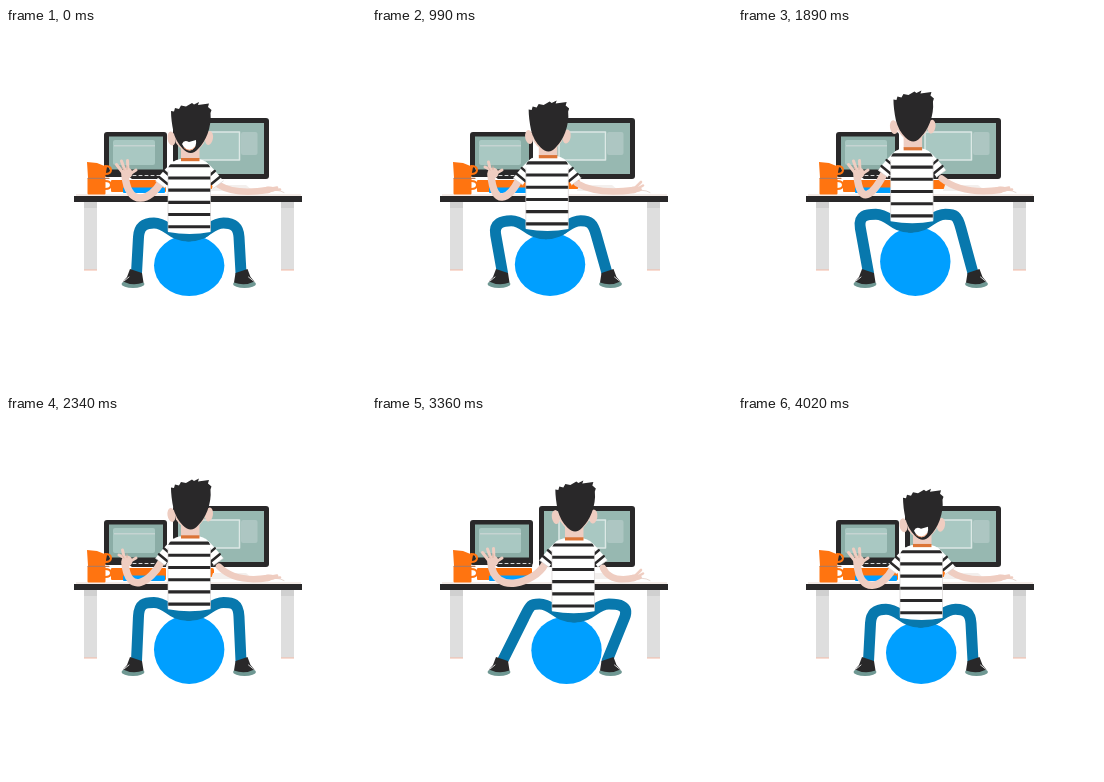
These frames come from a looping animation (360 px wide and 360 px high, 4.05 s). An HTML page with a canvas:

```html
<!DOCTYPE html>
<html lang="en">
<head>
<meta charset="utf-8">
<title>Desk bounce</title>
<style>
html, body { margin: 0; width: 100%; height: 100%; overflow: hidden; background: #fff; }
canvas { display: block; width: 360px; height: 360px; }
</style>
</head>
<body>
<canvas id="stage"></canvas>
<script>
const LOOP = 4050, STEP = 30, BEAT = LOOP / 8;
const INK = '#292829', SKIN = '#efcdc1', ORANGE = '#ff7410', PALE = '#a9c8c2',
  JEANS = '#0878ad', BALL = '#009fff', GREY = '#dedede';
const HEIGHTS = [16, 16, 15, 15, 12, 12, 10, 9];
const SWAY = [[0, 0], [600, 0], [1400, -17], [1480, -17], [2360, 0], [3380, 18], [4010, 0], [LOOP, 0]];

const canvas = document.getElementById('stage');
const c = canvas.getContext('2d');
const ratio = window.devicePixelRatio || 1;
canvas.width = canvas.height = 360 * ratio;
c.lineCap = c.lineJoin = 'round';

function rect(x, y, w, h, color, r = 0) {
  c.fillStyle = color;
  c.beginPath();
  c.roundRect(x, y, w, h, r);
  c.fill();
}

function oval(x, y, rx, ry, color, turn = 0) {
  c.fillStyle = color;
  c.beginPath();
  c.ellipse(x, y, rx, ry, turn, 0, 7);
  c.fill();
}

function fill(d, color) {
  c.fillStyle = color;
  c.fill(new Path2D(d));
}

function line(d, color, width) {
  c.strokeStyle = color;
  c.lineWidth = width;
  c.stroke(new Path2D(d));
}

function at(x, y, draw) {
  c.save();
  c.translate(x, y);
  draw();
  c.restore();
}

// draws once as is and once mirrored about the given axis
function pair(axis, draw) {
  draw(1);
  at(axis * 2, 0, () => {
    c.scale(-1, 1);
    draw(-1);
  });
}

function sway(t) {
  const i = SWAY.findIndex(k => k[0] > t);
  const [t0, a] = SWAY[i - 1], [t1, b] = SWAY[i];
  const u = (t - t0) / (t1 - t0);
  return a + (b - a) * u * u * (3 - 2 * u);
}

// skew moves the top of the hop: below 1 earlier, above 1 later
function hop(t, skew, power) {
  const n = Math.min(7, Math.floor(t / BEAT));
  const p = t / BEAT - n;
  return -HEIGHTS[n] * Math.pow(Math.max(0, Math.sin(Math.PI * Math.pow(p, skew))), power);
}

function drawScreens() {
  rect(98, 104, 63, 45, INK, 3);
  rect(103, 108.5, 54, 33, '#8bada6');
  rect(107, 112, 42, 25, PALE, 2);
  rect(108, 117, 41, 1.5, '#c5d4d2');

  rect(167, 90, 96, 61, INK, 3);
  rect(172, 95, 86, 51, '#97b8b1');
  rect(187, 104, 47, 28, PALE);
  line('M187 104H233.5V132H187Z', '#dce8e5', 1.5);
  rect(235, 104, 16.5, 23, '#adc6c2', 2);
}

function drawDesk() {
  for (const x of [78, 275]) {
    rect(x, 174, 13, 68, GREY);
    rect(x, 174, 13, 6, '#d0d0d0');
    rect(x, 241.5, 13, 1, '#f2b8a4');
  }
  rect(68, 168, 228, 6, INK);
  rect(70, 166.5, 225, 1, '#ead9d2');

  fill('M99 144H161L160 151H126L122 148H99Z', INK);
  c.setLineDash([3, 3]);
  line('M127 147.5H158', '#d8d8d8', 1);
  c.setLineDash([]);
  rect(105, 152, 55, 12, ORANGE, 1);
  rect(117, 159.5, 42, 5.5, BALL, 1);
  rect(185, 152, 23, 9, ORANGE, 2);
  fill('M207 157H240L247 163H205Z', '#f3efed');
  oval(270, 163, 8, 2.8, '#fff');
  line('M262 164.5Q270 160 278 164.5', '#e2cfc7', .8);

  for (const y of [142, 157]) {
    line(`M99 ${y - 4}Q105 ${y - 4} 105 ${y}Q105 ${y + 4} 99 ${y + 4}`, ORANGE, 2);
  }
  fill('M81 134L91 135L101 139L99 150H82Z', ORANGE);
  rect(81.5, 150, 18, 16.5, ORANGE, 1);
  line('M82 150.3H103', '#b77956', 1.2);
}

function drawLeg(x, y) {
  const knee = [132.5 + x, 209 + y], foot = [130.5, 245];
  const lead = knee.map((k, i) => k - (foot[i] - k) * .3);
  const p = (px, py) => (px + x) + ' ' + (py + y);
  line(`M${p(183, 208)}C${p(164, 208)} ${p(162, 195)} ${p(148, 195)}` +
    `C${p(139, 195)} ${lead.join(' ')} ${knee.join(' ')}L${foot.join(' ')}`, JEANS, 11);
}

function drawShoe() {
  oval(127, 256, 11.5, 4, '#6f9893');
  fill('M124 241L136 245L137.5 254.5Q127 258.5 117 253.5L121 249Z', INK);
  line('M118 253L123 249', '#efefef', .9);
}

function drawLeftArm(x, y, pointing) {
  const sx = 155 + x, sy = 154 + y * .7;
  line(`M119 147C122 180 ${sx - 10} ${sy + 19} ${sx} ${sy}`, SKIN, 7.5);
  oval(121, 145, 5.5, 5.5, SKIN, .4);
  line(pointing
    ? 'M119 145L116.5 134M119 142L113 139M123 146L130 142'
    : 'M117 145L110.5 136.5M119 143L115.5 133M122 143L121.5 132.5M124 146L130 142', SKIN, 3);
  line('M118 142L116 139M121 141.5V138', '#d9aa9a', .7);
}

function drawRightArm(x, y, raised) {
  const sx = 213 + x, sy = 157 + y * .6;
  line(`M${sx} ${sy}Q${229 + x * .5} 167 262 162`, SKIN, 6.5);
  oval(263, 161.5, 7, 3, SKIN, -.05);
  line(raised ? 'M262 161L269 154M265 161L271 157.5' : 'M263 161L271 159.5M265 162L274 161.5', SKIN, 2.6);
}

function drawSleeve() {
  fill('M168 133Q160 139 149.5 153L159 160L167 148Z', '#fff');
  line('M149.5 153L159 160', '#d7d2d0', .7);
  line('M153 149L161.5 156M158 143L165 149', INK, 2.5);
}

function drawShirt() {
  const body = 'M174 131Q184 134 193 131Q202 133 204.5 140V204Q184 208 162 204V140Q165 133 174 131Z';
  pair(183.4, drawSleeve);
  fill(body, '#fff');
  c.save();
  c.clip(new Path2D(body));
  for (let i = 0; i < 6; i++) rect(160, 136.2 + i * 12.2, 48, 3.1, INK);
  c.restore();
  line('M162 143V203M204.5 143V203', '#cfcaca', .6);
}

function drawNeck() {
  rect(175, 114, 18.5, 17, SKIN);
  rect(175, 130, 18.5, 3.2, '#dc7436');
}

function drawHead(hollow) {
  oval(165.5, 110.5, 4, 7, SKIN, -.15);
  oval(203, 110, 4, 7, SKIN, .15);
  fill('M168 104H201L198 115Q192 124 184 125Q176 124 170 115Z', SKIN);
  fill('M167.5 104Q165 92 165 83L168 83.5L169 80L173 81L175 77.5L180 78.5L186 75L188 76.5' +
    'L193 74L192 77L203 75.5L202 79L205.5 82L204.5 85Q205.5 95 201.5 106' +
    'Q198 115 192 121Q185 129 177 121Q170 114 167.5 104Z', INK);
  if (hollow) {
    fill('M176 116Q178 111 183 114L190 112Q191 119 186 122Q180 124 176 116Z', '#fff');
    line('M178 120Q184 125 189 119', '#f08b59', .8);
  }
}

function draw(t) {
  const x = sway(t);
  const y = hop(t, .85, .8);
  const headY = hop(t, 1.15, 1.3);
  const tap = t % 405 / 405;
  const point = t % 1350 / 1350;

  c.setTransform(ratio, 0, 0, ratio, 0, 0);
  c.fillStyle = '#fff';
  c.fillRect(0, 0, 360, 360);
  drawScreens();
  drawDesk();

  const ry = Math.min(35, 30.5 - y * .38);
  oval(183.2 + x * .63, 268 - ry, 35.2, ry, BALL);
  pair(182.75, side => drawLeg(side * x * 1.08, y * .8));
  at(x, y, () => fill('M162 199H205Q206 207 199 210Q184 215 169 210Q161 207 162 199Z', JEANS));
  pair(182.75, drawShoe);

  drawLeftArm(x, y, point > .67 && point < .8);
  drawRightArm(x, y, tap > .24 && tap < .6);
  at(x, y, () => {
    drawShirt();
    drawNeck();
  });
  at(x * 1.02, headY, () => drawHead(t >= 3960 || t < 60));
}

const start = performance.now();
function tick() {
  const t = (performance.now() - start) % LOOP;
  draw(Math.floor(t / STEP) * STEP);
  requestAnimationFrame(tick);
}
tick();
</script>
</body>
</html>
```
